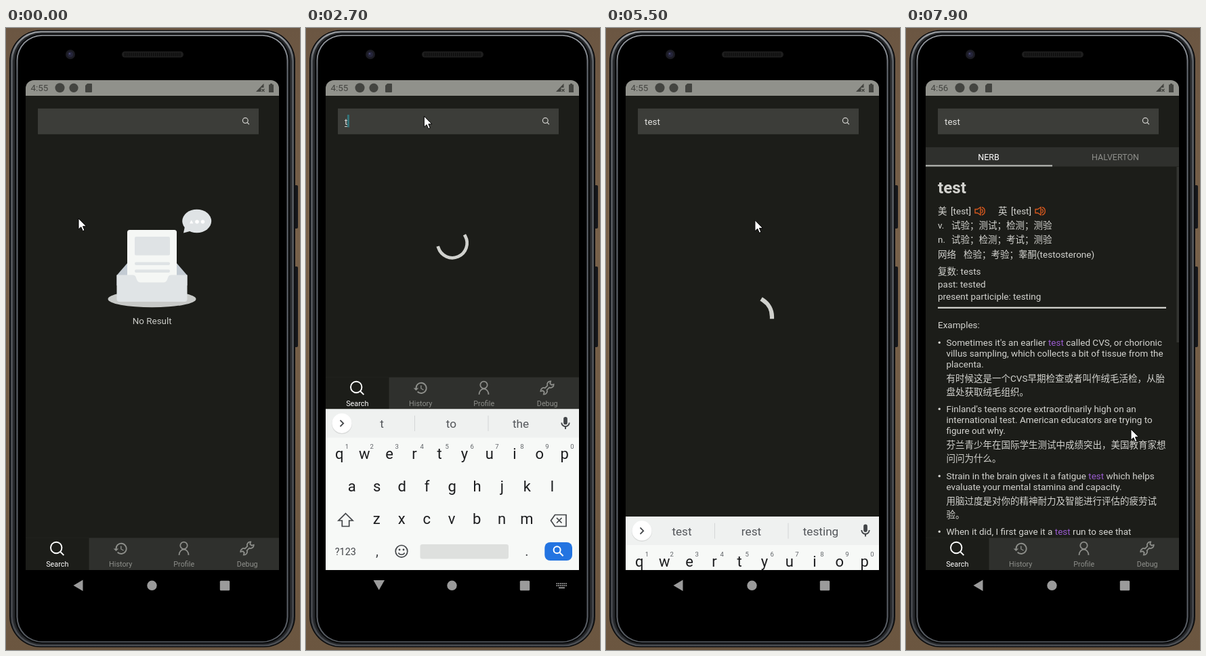
Write an HTML page that moves like this. It is 434x918 px and loops after 8000 ms.

```html
<!DOCTYPE html>
<html lang="zh-CN">
<head>
<meta charset="utf-8">
<title>Dictionary search</title>
<style>
html, body { margin: 0; width: 100%; height: 100%; overflow: hidden; background: #6f5a45; }
svg { display: block; width: 434px; height: 918px; }
text { font-family: Roboto, "Noto Sans CJK SC", "Noto Sans CJK", sans-serif; font-size: 13.5px; white-space: pre; }
.mid { text-anchor: middle; }
.line { fill: none; stroke-linecap: butt; }
</style>
</head>
<body>
<svg id="stage" viewBox="0 0 434 918" xmlns="http://www.w3.org/2000/svg"></svg>
<script>
const LOOP = 8000, STEP = 100, LIFT = 237, KEYS_H = 238;
const stage = document.getElementById('stage');

// ---- markup helpers
const rect = (x, y, w, h, fill, rx = 0, more = '') =>
  `<rect x="${x}" y="${y}" width="${w}" height="${h}" rx="${rx}" fill="${fill}" ${more}/>`;
const disc = (x, y, r, fill, more = '') => `<circle cx="${x}" cy="${y}" r="${r}" fill="${fill}" ${more}/>`;
const path = (d, fill, more = '') => `<path d="${d}" fill="${fill}" ${more}/>`;
const line = (d, color, w, more = '') => `<path class="line" d="${d}" stroke="${color}" stroke-width="${w}" ${more}/>`;
const text = (x, y, s, fill, size = 13.5, more = '') =>
  `<text x="${x}" y="${y}" fill="${fill}" style="font-size:${size}px" ${more}>${s}</text>`;
const mid = (x, y, s, fill, size, more = '') => text(x, y, s, fill, size, 'class="mid" ' + more);
const group = (id, body, more = '') => `<g id="${id}" ${more}>${body}</g>`;
const lens = (x, y, r, tail, color, w) =>
  disc(x, y, r, 'none', `stroke="${color}" stroke-width="${w}"`) +
  line(`M${x + r * .7} ${y + r * .7}l${tail} ${tail}`, color, w);

// ---- phone body: nested shells, [inset, fill]
const SHELLS = [[0, '#0d0e10'], [2, 'url(#rim)'], [5, '#26282b'], [8, '#08090a'], [10.5, 'url(#edge)'], [12.5, '#000']];
function body() {
  return rect(0, 0, 434, 918, 'url(#desk)') +
    rect(425, 232, 6, 64, '#15171b', 2) + rect(425, 352, 6, 119, '#15171b', 2) +
    SHELLS.map(([d, fill]) => rect(5 + d, 3 + d * .7, 422 - 2 * d, 911 - 1.4 * d, fill, 46 - d * .8)).join('') +
    disc(95, 39, 7, '#1b1b22') + disc(95, 39, 4, '#25253a') + disc(94, 38, 1.3, '#4a4a78') +
    rect(171, 34.5, 91, 9, '#1d1d1d', 4.5) +
    line('M175 39H258', '#0d0d0d', 5, 'stroke-dasharray="1.5 1.5"');
}

function statusBar() {
  const ink = '#434440';
  return path('M29 100V89a12 12 0 0 1 12-12H391a12 12 0 0 1 12 12V100z', '#90918b') +
    text(36.5, 93, '<tspan id="clock">4:55</tspan>', ink, 13.4) +
    disc(79.5, 88.3, 7, ink) + disc(100, 88.3, 6.6, ink) +
    path('M120 82h6a1 1 0 0 1 1 1v11a1 1 0 0 1-1 1h-8a1 1 0 0 1-1-1V85z', ink) +
    path('M380.5 82v6h-4v6H369z', ink) + line('M377.5 90l4 4m0-4l-4 4', ink, 1.2) +
    path('M388 83.500h2v-1.500h3v1.500h2V95h-7z', ink);
}

function emptyState() {
  const pale = '#dfe3e5';
  return `<ellipse cx="215.500" cy="400" rx="65" ry="12.300" fill="#c8cac8"/>` +
    path('M163.500 365L180 346H251L267.500 365V380H163.500z', '#c3cbd3') +
    rect(179, 298, 73, 82, '#f5f7f5', 3.5) + rect(190, 308, 52, 27.5, pale, 2) +
    rect(190, 345.5, 52, 4.5, pale, 2) + rect(190, 356.5, 52, 4.5, pale, 2) +
    path('M163.500 364.500H187q4 0 5 4q2 7 6 7H233q4 0 6-7q1-4 5-4H267.500V400q0 4-4 4H167.500q-4 0-4-4z', '#e0e4e6') +
    `<ellipse cx="281.700" cy="285" rx="21.500" ry="17.300" fill="${pale}"/>` +
    path('M264 293L262 302.500L275 299z', pale) +
    path('M271 288.500l2.700-5l2.700 5z', '#fff') + disc(282, 286, 2.8, '#fff') + disc(290.5, 286, 2.8, '#fff') +
    mid(215.7, 437, 'No Result', '#c9cac6', 13.4);
}

const WORDS = [
  ['test', 90, 'n. 测验，考查；测试；检验；化验; v. 测验；化验；'],
  ['testimony', 126, 'n. [法] 证词，证言；证据'],
  ['testing', 108, 'n. [试验] 测试; adj. 试验的；棘手的; v. 测验；考'],
  ['testify', 104, 'vt. 证明，证实；作证; vi. 作证；证明'],
  ['testament', 128, 'n. [法] 遗嘱；圣约；确实的证明'],
];
const wordList = () => WORDS.map(([w, x, def], i) => {
  const y = 190.5 + i * 27.9;
  return text(47, y, w, '#e0e0dc', 13.4) + text(x, y, def, '#979892');
}).join('');

const EXAMPLES = [
  [469, ["Sometimes it's an earlier *test* called CVS, or chorionic", 'villus sampling, which collects a bit of tissue from the', 'placenta.'],
    ['有时候这是一个CVS早期检查或者叫作绒毛活检，从胎', '盘处获取绒毛组织。']],
  [567, ["Finland's teens score extraordinarily high on an", 'international test. American educators are trying to', 'figure out why.'],
    ['芬兰青少年在国际学生测试中成绩突出，美国教育家想', '问问为什么。']],
  [666, ['Strain in the brain gives it a fatigue *test* which helps', 'evaluate your mental stamina and capacity.'],
    ['用脑过度是对你的精神耐力及智能进行评估的疲劳试', '验。']],
  [748, ['When it did, I first gave it a *test* run to see that'], []],
];

function speaker(x) {
  const c = '#d4581e';
  return line(`M${x} 267.500h3.500l4.500-3v11.500l-4.500-3h-3.500zM${x + 9.5} 267.500a3 3 0 0 1 0 5.500M${x + 10} 264.500a6 6 0 0 1 0 11.500`, c, 1.4);
}

function page() {
  const ink = '#d3d3cf';
  const rows = [
    [47, 275, '美'], [66, 275, '[test]'], [136, 275, '英'], [155, 275, '[test]'],
    [47, 296, 'v.'], [67, 296, '试验；测试；检测；测验'],
    [47, 317, 'n.'], [67, 317, '试验；检测；考试；测验'],
    [47, 338.5, '网络'], [85, 338.5, '检验；考验；睾酮(testosterone)'],
    [47, 364, '复数: tests'], [47, 382.5, 'past: tested'], [47, 401, 'present participle: testing'],
    [47, 443, 'Examples:'],
  ];
  let out = rect(29, 176, 374, 28.5, '#2f302d') + rect(29, 202, 187, 2.5, '#a8a9a5') +
    mid(122, 195.3, 'NERB', '#fff', 12.5) + mid(309, 195.3, 'HALVERTON', '#8d8e8a', 12.5) +
    text(47, 244, 'test', ink, 24.2, 'font-weight="700"') +
    rows.map(([x, y, s]) => text(x, y, s, ink)).join('') +
    speaker(102) + speaker(191) + rect(47, 411.7, 337, 2.3, '#cfcfcb');
  for (const [top, en, zh] of EXAMPLES) {
    out += disc(49.3, top - 4.7, 1.7, ink);
    en.forEach((s, i) => {
      out += text(59.5, top + i * 16.1, s.replace(/\*(\w+)\*/, '<tspan fill="#9a5bd0">$1</tspan>'), ink);
    });
    zh.forEach((s, i) => { out += text(59.5, top + en.length * 16.1 + 5 + i * 19.5, s, ink); });
  }
  return out + rect(399.5, 205, 3.5, 259, '#343532');
}

function tabs() {
  const dim = '#8d8e8a';
  return rect(29, 752.5, 374, 47.5, '#2f302d') + rect(29, 752.5, 93.5, 47.5, '#1c1d19') +
    lens(74.2, 767, 8.2, 5.4, '#fff', 1.9) +
    path('M13 3a9 9 0 0 0-9 9H1l3.890 3.890.070.140L9 12H6a7 7 0 1 1 2.060 4.940l-1.420 1.420A9 9 0 1 0 13 3zm-1 5v5l4.280 2.540.720-1.210-3.500-2.080V8H12z', dim, 'transform="translate(157.700 757) scale(.95)"') +
    disc(262.5, 763.8, 5.2, 'none', `stroke="${dim}" stroke-width="1.8"`) +
    line('M255.500 778a7 8.500 0 0 1 14 0', dim, 1.8) +
    line('M2.500-2A4.700 4.700 0 0 1 10.500-3.200L7.500-1.500V1.500L10.500 3.200A4.700 4.700 0 0 1 2.500 2H-2.500A4.700 4.700 0 0 1-10.500 3.200L-7.500 1.500V-1.500L-10.500-3.200A4.700 4.700 0 0 1-2.500-2z', dim, 1.8, 'transform="translate(356 768) rotate(-45)"') +
    ['Search', 'History', 'Profile', 'Debug'].map((s, i) =>
      mid(75.75 + i * 93.5, 795.3, s, i ? dim : '#fff', 10.8)).join('');
}

function letters(upper) {
  return [['qwertyuiop', 49.2, 638], ['asdfghjkl', 67.8, 686], ['zxcvbnm', 104.3, 734]].map(([row, x, y]) =>
    [...row].map((c, i) => mid(x + i * 36.95, upper ? y : y - 2, upper ? c.toUpperCase() : c, '#1c1d1f', 22)).join('')
  ).join('');
}

function keyboard() {
  const ink = '#424548';
  const arrow = 'M58.500 716.500L69 727H63.700V735.500H53.300V727H48z';
  const hints = [...'1234567890'].map((c, i) => mid(60.3 + i * 36.95, 621, c, '#5f6367', 9.5)).join('');
  return rect(29, 562.5, 374, 237.5, '#f7f9f7') + rect(29, 562.5, 374, 42, '#eff1f0') +
    disc(53, 584.3, 15, '#d9dbda') + disc(53, 583.3, 14.6, '#fff') + line('M50.500 578.800l4.700 4.700l-4.700 4.700', ink, 1.8) +
    [112, 214.5, 317].map((x, i) => mid(x, 590, '', '#54575b', 17.2, `id="hint${i}"`)).join('') +
    rect(160, 572, 1, 23, '#d4d6d6') + rect(268.5, 572, 1, 23, '#d4d6d6') +
    path('M12 14a3 3 0 0 0 3-3V5a3 3 0 0 0-6 0v6a3 3 0 0 0 3 3zm5-3a5 5 0 0 1-10 0H5a7 7 0 0 0 6 6.920V21h2v-3.080A7 7 0 0 0 19 11h-2z', ink, 'transform="translate(371.600 572) scale(.95)"') +
    hints +
    group('upper', letters(true) + path(arrow, ink)) +
    group('lower', letters(false) + line(arrow, ink, 1.7)) +
    line('M367.500 718.500H384V735.500H367.500L361.500 727zM370 723l7.500 7.500m0-7.500l-7.500 7.500', ink, 1.7) +
    mid(58.3, 777.7, '?123', ink, 14.4) + mid(105, 779, ',', ink, 20) + mid(326, 779, '.', ink, 20) +
    disc(141, 772.3, 8.8, 'none', `stroke="${ink}" stroke-width="1.700"`) +
    disc(138, 770, 1.4, ink) + disc(144, 770, 1.4, ink) + line('M136.500 774.500a4.800 4.200 0 0 0 9 0', ink, 1.6) +
    rect(168.5, 762, 130.5, 21.5, '#dee0de', 3) +
    rect(352.3, 759, 40.7, 27, '#2374e1', 8) + lens(370.6, 770.3, 5, 5.5, '#fff', 2);
}

function systemBar() {
  const ink = '#9b9b9b';
  let dots = '';
  for (let i = 0; i < 12; i++) dots += rect(369.5 + (i % 6) * 2.7, 819 + (i / 6 | 0) * 3, 1.7, 1.9, ink);
  return rect(29, 800, 374, 46, '#000') +
    path('M113.500 814.500V831L99.500 822.700z', ink, 'id="back"') +
    path('M99.500 815H116L107.700 829.500z', ink, 'id="down"') +
    disc(215.5, 822.8, 7.2, ink) + rect(315.8, 815.8, 14.4, 14.4, ink, 1.5) +
    group('switcher', dots + rect(373, 825.3, 9, 1.8, ink));
}

stage.innerHTML = `<defs>
  <linearGradient id="desk" x2="0" y2="1"><stop stop-color="#6b5642"/><stop offset=".35" stop-color="#77614a"/><stop offset="1" stop-color="#6b5640"/></linearGradient>
  <linearGradient id="rim" x2="0" y2="1"><stop stop-color="#a2a5a9"/><stop offset=".05" stop-color="#565a5f"/><stop offset=".95" stop-color="#42454a"/><stop offset="1" stop-color="#505358"/></linearGradient>
  <linearGradient id="edge" x2="0" y2="1"><stop stop-color="#a0a4aa"/><stop offset=".06" stop-color="#666b72"/><stop offset="1" stop-color="#5a5f66"/></linearGradient>
  <clipPath id="screen"><rect x="29" y="77" width="374" height="723"/></clipPath>
  <clipPath id="column"><rect x="29" y="100" width="355.500" height="660"/></clipPath>
</defs>` + body() +
  rect(29, 99, 374, 701, '#1c1d19') + statusBar() +
  rect(47, 118.8, 326, 38, '#3c3d39') + lens(353.3, 136.6, 3.9, 2.9, '#d2d2cf', 1.2) +
  text(57, 142.7, '', '#e2e2df', 13.4, 'id="query"') +
  rect(57, 145, 10, 1, '#d0d0cd', 0, 'id="under"') + rect(56, 128, 3, 18.5, '#33747a', 0, 'id="caret"') +
  group('empty', emptyState()) + group('list', wordList(), 'clip-path="url(#column)"') + group('page', page()) +
  line('', '#d0d1cd', 5, 'id="spin" style="stroke-linecap:square"') +
  `<g clip-path="url(#screen)">${group('tabs', tabs())}${group('keys', keyboard())}</g>` + systemBar() +
  path('M0 0V16.200L3.800 12.700L6.400 18.700L9 17.600L6.500 11.800H11.600z', '#fff', 'id="mouse" stroke="#000" stroke-width="1"');

const el = {};
stage.querySelectorAll('[id]').forEach(n => el[n.id] = n);

// ---- timeline
const MOUSE = [[500, 107, 281], [900, 174.3, 129], [1200, 174.3, 129], [1300, 174.3, 130], [4500, 174.3, 130],
  [4700, 149, 161], [4800, 148, 199], [5000, 148, 199], [5100, 158.5, 188], [5300, 158.5, 188], [5800, 312, 427],
  [6000, 312, 427], [6100, 312.5, 430.5], [7600, 312.5, 430.5], [7700, 322, 505], [7800, 330, 570], [7900, 332, 592]];
const SLIDE = [[1200, KEYS_H], [1500, 0], [5300, 0], [5600, KEYS_H]];
const QUERY = [[0, ''], [2300, 't'], [2800, 'te'], [3200, 'tes'], [3900, 'test']];
const HINTS = [[0, 'We|I|Thanks'], [2300, 't|to|the'], [2800, 'te|the|tell'], [3200, 'tes|test|yes'], [4100, 'test|rest|testing']];
const WIDTH = [0, 4.4, 11.5, 18.4, 22.8];
const SPINS = [[2400, 2850], [2850, 3255], [3255, 3700], [3950, 4600], [5340, 6900]];

const within = (t, ...spans) => spans.some(([a, b]) => t >= a && t < b);
const at = (table, t) => table.filter(k => k[0] <= t).pop()[1];
function tween(table, t) {
  const i = table.findIndex(k => k[0] > t);
  if (i < 0) return table[table.length - 1].slice(1);
  if (!i) return table[0].slice(1);
  const a = table[i - 1], b = table[i], p = (t - a[0]) / (b[0] - a[0]);
  return a.slice(1).map((v, j) => v + (b[j + 1] - v) * p);
}

// cubic-bezier(.4, 0, .2, 1)
function ease(x) {
  if (x <= 0) return 0;
  if (x >= 1) return 1;
  let lo = 0, hi = 1, u;
  for (let i = 0; i < 20; i++) {
    u = (lo + hi) / 2;
    if (1.2 * u * (1 - u) ** 2 + .6 * u * u * (1 - u) + u ** 3 < x) lo = u; else hi = u;
  }
  return 3 * u * u * (1 - u) + u ** 3;
}

function arc(cx, cy, r, age) {
  const p = age / 1333 % 1;
  const turn = -90 + age / 5250 * 720 + p * 90;
  const from = turn + 270 * ease(p * 2 - 1), to = Math.max(turn + 270 * ease(p * 2), from + 1);
  const pt = deg => [cx + r * Math.cos(deg * Math.PI / 180), cy + r * Math.sin(deg * Math.PI / 180)].map(v => v.toFixed(2));
  return `M${pt(from)}A${r} ${r} 0 ${to - from > 180 ? 1 : 0} 1 ${pt(to)}`;
}

const show = (n, on) => { n.style.display = on ? '' : 'none'; };
const move = (n, x, y) => n.setAttribute('transform', `translate(${x} ${y})`);

function draw(t) {
  const lifted = within(t, [1400, 5400]);
  const query = at(QUERY, t), w = WIDTH[query.length];
  el.clock.textContent = t < 6300 ? '4:55' : '4:56';
  el.query.textContent = query;
  el.under.setAttribute('width', w);
  show(el.under, w && t < 5200);
  el.caret.setAttribute('x', 56.5 + w);
  show(el.caret, within(t, [1100, 2000], [2300, 4600], [5100, 5200]));

  show(el.empty, t < 1100);
  show(el.list, within(t, [3700, 3900], [4600, 5300]));
  show(el.page, t >= 6900);

  const spin = SPINS.find(s => within(t, s));
  show(el.spin, spin);
  if (spin) {
    const big = spin[0] > 5000;
    const y = big ? (lifted ? 307 : 426) : 317.5;
    el.spin.setAttribute('d', arc(216, y, big ? 29 : 21.7, t - spin[0]));
    el.spin.setAttribute('stroke-width', big ? 6.2 : 4.7);
  }

  move(el.tabs, 0, lifted ? -LIFT : 0);
  const [drop] = tween(SLIDE, t);
  move(el.keys, 0, drop);
  show(el.keys, drop < KEYS_H);
  show(el.upper, t < 2300);
  show(el.lower, t >= 2300);
  at(HINTS, t).split('|').forEach((s, i) => { el['hint' + i].textContent = s; });

  const down = within(t, [1300, 5400]);
  show(el.down, down);
  show(el.back, !down);
  show(el.switcher, within(t, [1100, 5500]));
  move(el.mouse, ...tween(MOUSE, t));
}

const start = performance.now();
function tick() {
  const t = (performance.now() - start) % LOOP;
  draw(Math.floor(t / STEP) * STEP);
  requestAnimationFrame(tick);
}
tick();
</script>
</body>
</html>
```
